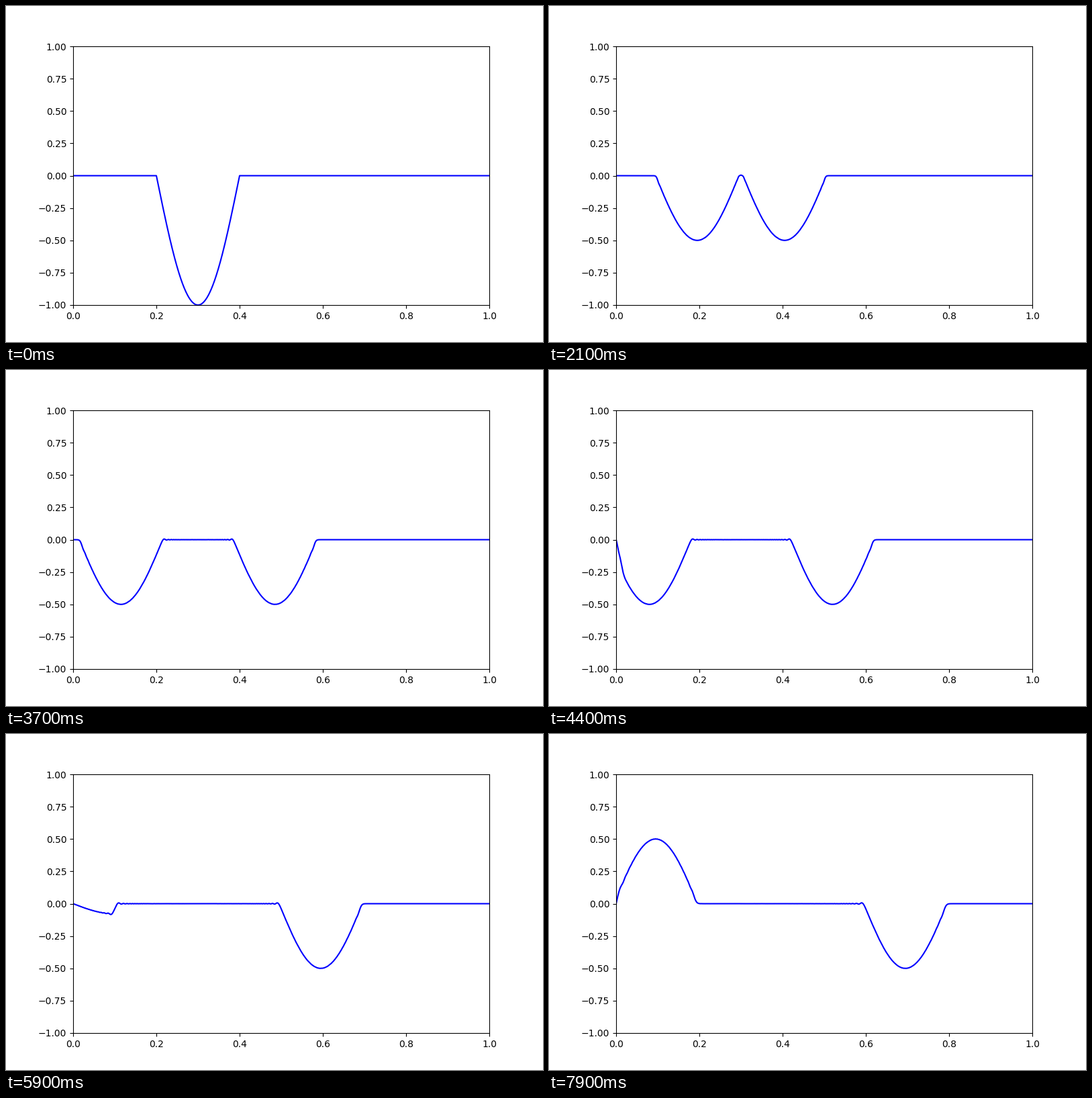
Animation of 800 by 500 pixels, one loop 8 s. Source, as a matplotlib script:

```python
import numpy as np
import matplotlib.pyplot as plt
from matplotlib.animation import FuncAnimation

FRAMES = 80
INTERVAL = 100      # ms
CELLS = 1000
COURANT = 0.2       # c * dt / dx
STEPS = 25          # solver steps per frame


def curvature(u):
    d = np.zeros_like(u)
    d[1:-1] = u[2:] - 2 * u[1:-1] + u[:-2]
    return d


def solve(u):
    """Leapfrog wave equation with fixed ends, starting at rest."""
    r2 = COURANT ** 2
    prev = u + 0.5 * r2 * curvature(u)
    states = [u]
    for _ in range(FRAMES - 1):
        for _ in range(STEPS):
            u, prev = 2 * u - prev + r2 * curvature(u), u
        states.append(u)
    return states


x = np.linspace(0, 1, CELLS + 1)
pluck = np.where((x > 0.2) & (x < 0.4), -np.sin(np.pi * (x - 0.2) / 0.2), 0.0)
states = solve(pluck)

fig, ax = plt.subplots(figsize=(8, 5), dpi=100)
ax.set_xlim(0, 1)
ax.set_ylim(-1, 1)
line, = ax.plot(x, pluck, color="blue")


def update(i):
    line.set_ydata(states[i])
    return line,


anim = FuncAnimation(fig, update, frames=FRAMES, interval=INTERVAL,
                     repeat=True, repeat_delay=0)
plt.show()
```
